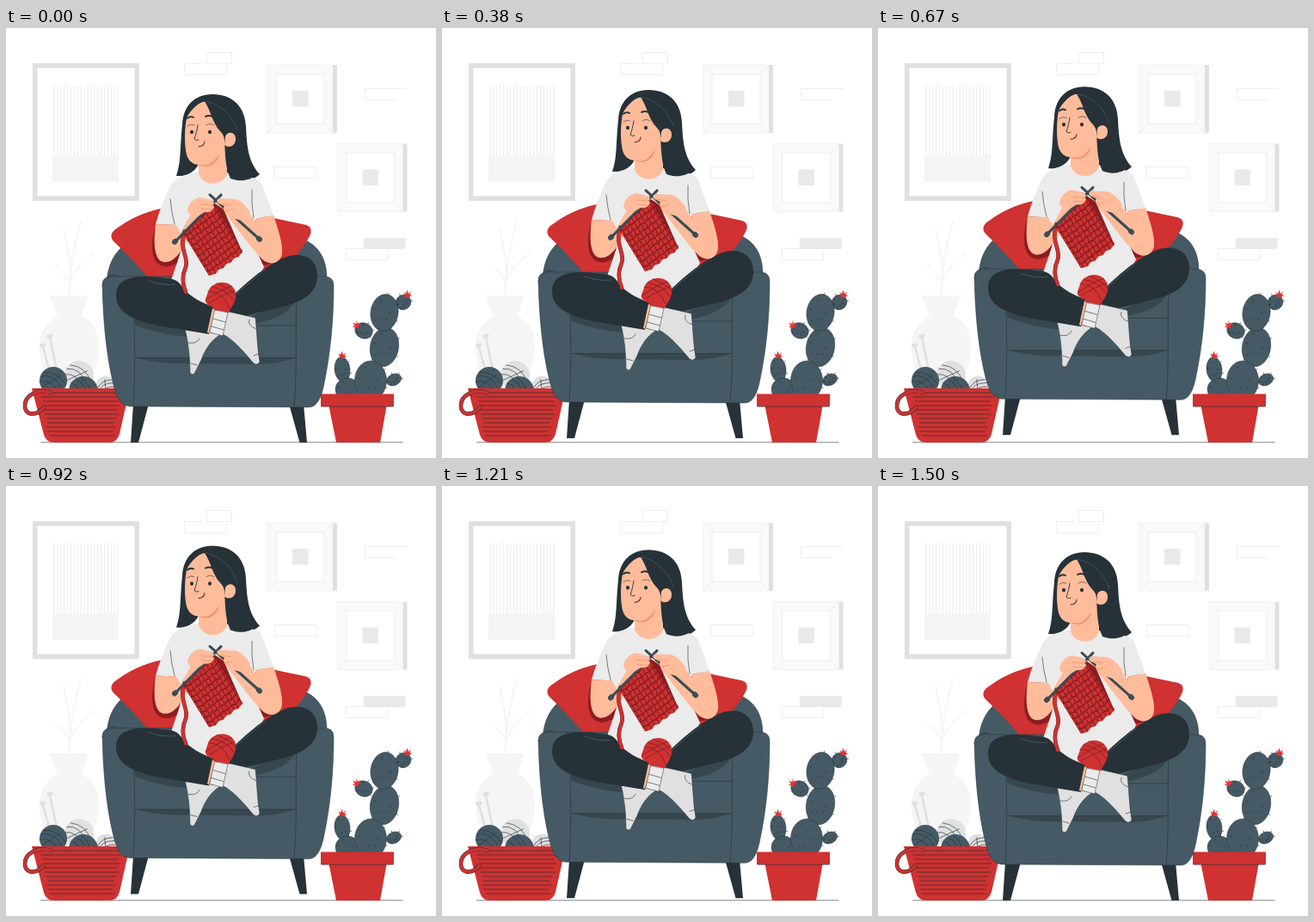
These frames come from a looping animation (500x500 px, 1.54 s). An HTML page:

```html
<!DOCTYPE html>
<html lang="en">
<head>
<meta charset="utf-8">
<title>Knitting</title>
<style>
html, body { margin: 0; height: 100%; overflow: hidden; background: #fff; }
svg { display: block; width: 100vw; height: 100vh; }
path { stroke-linecap: round; stroke-linejoin: round; }
.ink { fill: none; stroke: #263238; stroke-width: .6; }
.faint { fill: none; stroke: #e9e9e9; stroke-width: .8; }
.red { fill: #d03131; }
.wine { fill: #8c1c20; }
.slate { fill: #455a64; }
.dusk { fill: #37474f; }
.dark { fill: #263238; }
.skin { fill: #ffbc9b; }
.cloth { fill: #ebebeb; }
.sock { fill: #e0e0e0; }
.edge { stroke: #263238; stroke-width: .5; }
.blush { fill: none; stroke: #e58a66; stroke-width: .7; }
.cord { fill: none; stroke: #d03131; }
</style>
</head>
<body>
<svg viewBox="0 0 500 500">
  <defs>
    <g id="picture">
      <path fill="#e0e0e0" d="M76 0h5v79h-5z"/>
      <path fill="#fafafa" stroke="#ebebeb" stroke-width=".6" d="M0 0H76V79H0z"/>
      <path fill="#fff" stroke="#ebebeb" stroke-width=".8" d="M10.500 10.500H66V68.500H10.500z"/>
      <path class="faint" d="M0 0L10.500 10.500M76 0L66 10.500M0 79L10.500 68.500M76 79L66 68.500"/>
      <path fill="#e9e9e9" d="M29 30h18.500v18.500H29z"/>
    </g>
    <path id="flower" fill="#e13434" d="M-2.500 4L-4.500-2-2 0-.5-4.500 1 0 4-3 2.500 1 5 2 2 4z"/>
  </defs>

  <!-- wall -->
  <path fill="#fff" stroke="#e0e0e0" stroke-width="5.500" style="stroke-linejoin:miter" d="M33.700 43.700H152.200V198.200H33.700z"/>
  <path id="fringe" fill="none" stroke="#e6e6e6" stroke-width=".8"/>
  <path fill="#f4f4f4" d="M54 150C64 147 72 150 82 148.500 98 150.500 112 148 131 147V179H54z"/>
  <use href="#picture" x="304" y="43"/>
  <use href="#picture" x="385.500" y="134.500"/>
  <path class="faint" d="M233 41V28.500H262.500V41zM228 41.500H207.500V54.500H256.500V43M466 70.500H417.500V83.500H453M312.500 161.500H361V167M312.500 161.500V174.500H361.500V170M416 256.500H395.500V269.500H443.500V260"/>
  <path fill="#e9e9e9" d="M416 244h48.500v13H416z"/>

  <!-- vase and basket -->
  <path class="faint" d="M74 311C73 290 77 262 87 225M75 285C74 265 70 250 67 233M74 295Q67 283 57 275M75 294C80 280 91 270 102 262"/>
  <path fill="#f5f5f5" d="M51 311H95.500L88 335C102 342 108 355 108 369 108 395 98 410 88 419H60C48 410 39 394 39 369 39 355 46 341 60 335z"/>
  <path fill="none" stroke="#e0e0e0" stroke-width="2.600" d="M43 371L51 400M51 359L59 398"/>
  <path fill="none" stroke="#e0e0e0" stroke-width="4.500" d="M41.500 369.500L44.500 368.700M49.500 358.500L52.500 357.700"/>
  <g id="yarn"></g>
  <path class="ink" d="M40.500 481.800H461"/>
  <path class="red" d="M30 419H144L132 472Q129 482 120 482H56Q47 482 44 473z"/>
  <path id="weave" class="ink" style="stroke-width:.7"/>
  <path class="ink" style="stroke-width:4.600" d="M52 424C37 419 22 427 22 439 22 452 36 451 44 441"/>
  <path class="cord" stroke-width="3.600" d="M52 424C37 419 22 427 22 439 22 452 36 451 44 441"/>

  <!-- cactus -->
  <g id="cactus"></g>
  <use href="#flower" x="467" y="309"/>
  <use href="#flower" transform="translate(407 345) rotate(-50)"/>
  <use href="#flower" x="391" y="380"/>
  <path class="red" d="M375 437H443L435 482H384zM366 425.500H451V440H366z"/>
  <path class="ink" d="M367 440.300H450"/>

  <g id="float">
    <!-- armchair -->
    <path class="dark" d="M148 437H166L154 482H145zM329 437H346L350 482H341.500z"/>
    <path class="slate edge" d="M117 300C117 270 132 252 152 244H340C361 250 373 265 373 292L365 340H125z"/>
    <path class="red" d="M126 235C142 223 160 214 180 210L215 225 208 293H167C156 279 140 262 125 248 121 243 122 239 126 235z"/>
    <path class="wine" d="M176 226C169 240 168 262 174 271 181 281 195 279 205 268L208 240z"/>
    <path class="red" d="M292 217L349 229C355 231 356 236 353 242 344 260 328 277 305 291L275 290z"/>
    <path class="wine" d="M282 240V262C285 272 296 279 309 274L302 250z"/>
    <path class="slate edge" d="M112 299C112 290 118 288 130 289H365C376 288 381 291 381 300 381 340 377 380 370 413 367 429 362 441 352 441L146 440C133 440 129 430 125 415 116 378 113 338 112 299z"/>
    <path class="dusk" d="M150 336L209 350 210 359C186 357 164 351 150 345zM282 337L338 312C336 327 318 338 292 343zM152 383.500H337C320 389 306 391 292 391L213 390C188 391 167 388 152 383.500z"/>
    <path class="ink" d="M149 337C150 375 150 410 148 438M338 310C336 350 339 400 335 440M151 383.500H337M288 346H338M118 291Q121 285 130 288"/>

    <!-- hair and shirt -->
    <path class="dark" d="M240 77C263 77 278 91 279 115 280 135 281 155 295 170 285 180 268 180 258 170L224 158C219 169 208 173 198 172 204 155 202 140 205 112 206 91 219 77 240 77z"/>
    <path class="cloth" d="M224 167C207 171 196 174 191 184 184 198 178 213 174 228L197 229 206 245C204 262 196 280 192 294L205 325H275L300 278 285 245 290 222 311 217.500C306 204 301 190 297 180 290 172 275 171 257 168z"/>
    <path class="ink" d="M191 199Q192 213 196 228M286 188Q285 205 288 221"/>
    <path class="skin" d="M224 150V169C228 184 251 185 257 170V132L238 140z"/>
    <path fill="#f79368" d="M222 157Q237 165 246 148L249 144Q247 155 238 160 230 163 222 158z"/>
    <path class="skin" d="M212 98C208 108 207 130 209 142 210 153 216 159 225 159 235 159 241 156 246 149L257 140 262 124 241 88 227 85z"/>
    <path class="dark" d="M231 85C238 97 240 107 244 113 248 121 253 121 254 130 255 148 255 163 261 175 274 180 284 176 290 172 277 150 281 120 276 104 270 84 250 77 238 78 220 78 207 93 208 109 213 97 221 88 231 85z"/>
    <path class="skin" d="M255 126C257 120 267 120 267 129 267 138 258 140 254 136z"/>
    <path class="ink" style="stroke:#607d8b;stroke-width:.4" d="M232 85C251 90 262 101 269 119"/>
    <path class="ink" style="stroke-width:1.900" d="M211 105Q214 102 218 104M232 103Q236 101 240 103"/>
    <path class="ink" d="M211 114Q215 111 219 113M233 113Q237 110 242 113"/>
    <path class="ink" style="stroke-width:.9" d="M223 113C222 119 221 124 219 129Q221 132 224 130"/>
    <path class="ink" style="stroke-width:1" d="M224 138Q231 138 231 132"/>
    <path fill="#b9252a" d="M226 138Q231 137 231 133Q229 135 226 138z"/>
    <path class="ink" style="stroke-width:4" d="M216 120.800V121.200M237 120.800V121.200"/>

    <!-- legs and socks -->
    <path class="sock edge" d="M208 349L254 351 247 358C237 365 231 375 227 386L219 402Q216 404 214 401C214 383 212 366 208 349z"/>
    <path class="dark" d="M264 311C285 291 310 270 330 265 350 261 363 272 362 290 361 308 346 317 326 323L269 337C250 344 240 352 228 354L205 350 231 332z"/>
    <path class="dark" d="M186 291C158 287 128 287 128 311 128 332 150 340 176 346L236 356 241 324C228 320 214 312 206 303 202 295 196 291 186 291z"/>
    <path class="skin" d="M240 326L246 329 241 356 234 354z"/>
    <path class="sock edge" d="M246 327L290 337C292 355 292 372 295 388Q293 393 288 390C278 378 266 364 254 357L237 354z"/>
    <path class="cloth edge" d="M243 328L258 331 252 358 237 354z"/>
    <path class="ink" d="M241 338L255 342M239 347L253 351M283 339Q280 346 291 350M288 381L294 379M212 366Q222 368 225 361M215 390L222 392"/>
    <path class="ink" style="stroke:#607d8b;stroke-width:.5" d="M268 309Q285 295 301 281M166 294Q183 300 197 298"/>

    <!-- ball in the lap -->
    <path class="red" d="M236 304C243 293 262 292 267 307 269 317 262 324 259 331L241 327C243 323 230 323 232 315z"/>
    <path class="ink" style="stroke:#5c1c20" d="M235 306Q252 306 260 326M239 301Q257 304 265 317M245 297Q260 302 267 311M233 316Q246 306 262 300M236 320Q250 311 266 305"/>

    <!-- arms, knitting, needles -->
    <path class="skin" d="M174 228L198 229 203 238 222 204 240 201 242 211C228 222 216 240 204 258 197 270 187 275 180 271 171 265 172 244 174 228z"/>
    <path class="skin" d="M290 222L311 217.500C316 233 322 250 321 262 319 274 307 277 298 269 285 256 271 236 260 222L246 207 254 199 271 201C280 209 284 218 291 226z"/>
    <path class="ink" style="stroke:#5c1c20;stroke-width:4.600" d="M207 240C201 257 213 267 209 278 204 289 205 298 209 307"/>
    <path class="cord" stroke-width="3.800" d="M207 240C201 257 213 267 209 278 204 289 205 298 209 307"/>
    <path class="wine" d="M243 204L206 239 236 288 275 261 253 211z"/>
    <path id="rows" class="cord" stroke-width="5"/>
    <path id="ticks" fill="none" stroke="#5c1c20" stroke-width=".9"/>
    <g fill="none" stroke-width="3" stroke="#3c4d56">
      <path d="M198 247L250 194M293 244L237 194"/>
      <path stroke-width="6" d="M196 249L197 248M295 246L294 245"/>
      <path class="ink" style="stroke-width:.5" d="M199 248L251 195M292 245L237 195"/>
    </g>
    <path class="skin" d="M211 213C212 203 219 198 226 197L239 200Q244 203 240 206 244 208 240 211 238 215 231 214L218 222z"/>
    <path class="skin" d="M278 225L284 214C279 207 274 201 267 199L248 198Q243 200 247 204L254 207Q251 211 256 213L263 221z"/>
    <path class="blush" d="M239 206L226 205M239 211L227 210M248 204L261 206M255 213L264 211"/>
  </g>
</svg>
<script>
const $ = id => document.getElementById(id);
const path = (id, d) => $(id).setAttribute('d', d);
const range = (n, f) => Array.from({ length: n }, (_, i) => f(i)).join('');

path('fringe', range(20, i => `M${56 + i * 3.9} ${66 + i * 7 % 4}V150`));
path('weave', range(11, i => {
  const y = 424 + i * 5, inset = (y - 424) * .2;
  return `M${39 + inset + i * 5 % 4} ${y}H${136 - inset - i * 7 % 5}`;
}));

const ball = (x, y, r, fill, turn) => `<g transform="translate(${x} ${y}) rotate(${turn}) scale(${r})">
  <circle r="1" fill="${fill}"/>
  <path class="ink" style="stroke-width:${.6 / r}" d="M-.9-.3Q0-.6 .7 .6M-.7-.6Q.3-.7 .9 .3
  M-1 .1Q-.1-.2 .4 .9M-.8 .5Q-.1 0 .5-.4"/></g>`;
$('yarn').innerHTML = ball(85, 404, 17, '#e0e0e0', 10) + ball(116, 416, 11.5, '#e0e0e0', -60) +
  ball(55, 410, 16, '#455a64', 0) + ball(90, 422, 17, '#455a64', 40);

const pad = ([x, y, rx, ry, turn]) => `<g transform="translate(${x} ${y}) rotate(${turn})">
  <ellipse class="slate edge" rx="${rx}" ry="${ry}"/>
  <path class="ink" d="${range(9, i => {
    const a = i * 2.4, k = .35 + i % 3 * .32;
    return `M${rx * k * Math.cos(a)} ${ry * k * Math.sin(a)}l${2 * Math.cos(a)} ${2 * Math.sin(a)}`;
  })}"/></g>`;
$('cactus').innerHTML = [
  [462, 319, 9, 8.5, -30], [416, 352, 10.5, 9, 25], [440, 371, 16.5, 23, 10], [440, 331, 16, 21.5, 8],
  [451, 409, 9, 6.5, -25], [391, 397, 9, 14.5, -6], [397, 420, 14, 13, 0], [424, 410, 18.5, 23, 0]
].map(pad).join('');

// The slanted swatch: rope-like rows, each crossed by short twist marks
const stitch = (row, col) => {
  const wave = col % 2 ? .8 : -.8;
  return [208 + row * 3.7 + col * 4.4 + wave * .6, 238 + row * 6 - col * 3.25 + wave];
};
path('rows', range(9, row => range(9, col => (col ? 'L' : 'M') + stitch(row, col))));
path('ticks', range(9, row => range(9, col => {
  const [x, y] = stitch(row, col);
  return `M${x - 1} ${y - 2.2}q2.600 1 2 3.800`;
})));

const LOOP = 1540, LIFT = 8.8, LEAD = 41;
function draw(now) {
  const phase = (now + LEAD) % LOOP / LOOP;
  const y = -LIFT / 2 * (1 - Math.cos(phase * 2 * Math.PI));
  $('float').setAttribute('transform', `translate(0 ${y.toFixed(2)})`);
  requestAnimationFrame(draw);
}
draw(performance.now());
</script>
</body>
</html>
```
